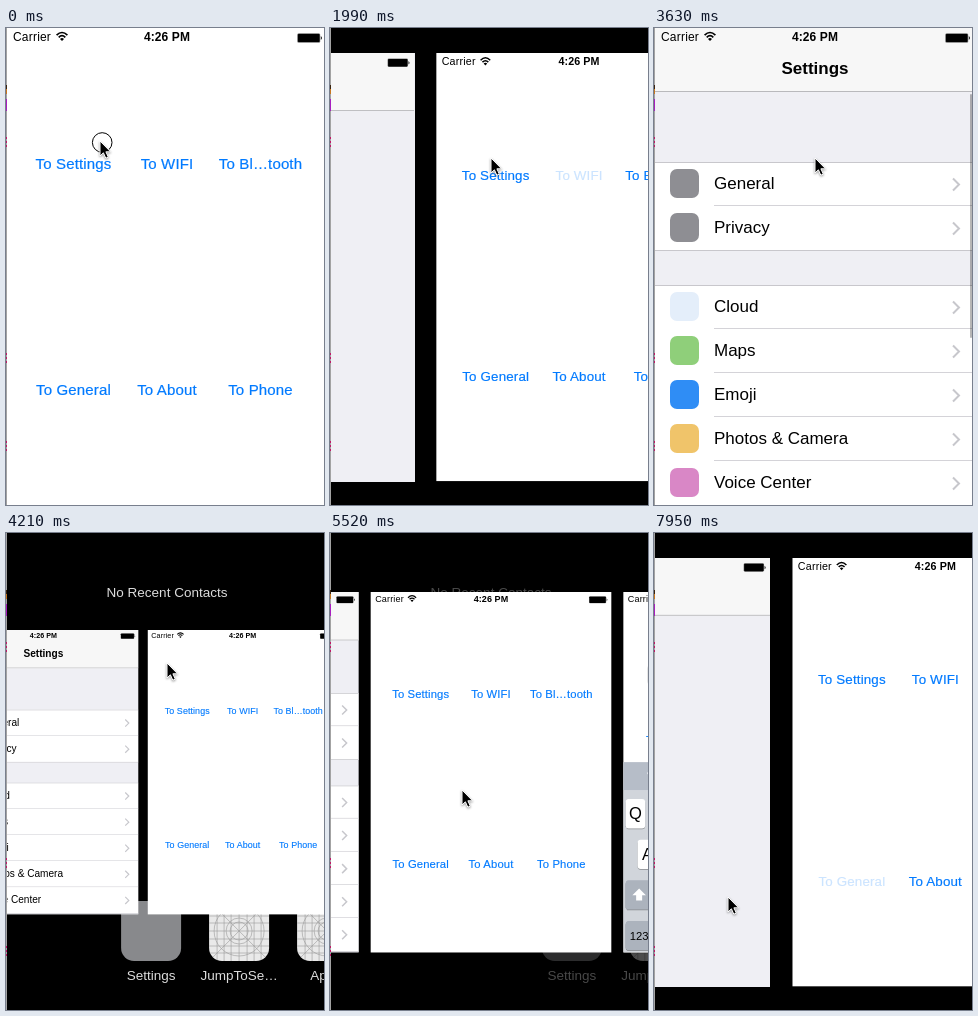
An HTML page for the animation above (8 s loop, 318x477 px).

```html
<!DOCTYPE html>
<html lang="en">
<head>
<meta charset="utf-8">
<title>App switching</title>
<style>
html, body { margin: 0; width: 100%; height: 100%; overflow: hidden; background: #000; }
#stage { position: relative; width: 318px; height: 477px; overflow: hidden; background: #000;
  font-family: "Liberation Sans", Arial, sans-serif; }
#stage * { position: absolute; box-sizing: border-box; white-space: nowrap; }
#stage svg { overflow: visible; }
.mid { transform: translate(-50%, -50%); line-height: 20px; }
.left { transform: translateY(-50%); line-height: 20px; }
.anim, .step { animation: 8s linear infinite; }
.step { animation-timing-function: step-end; }

/* Cards */
#deck { left: 1px; top: -1px; width: 320px; height: 480px; animation-name: slide, zoom; }
.card { width: 320px; height: 480px; background: #fff; overflow: hidden; }
#settings { background: #efeff4; left: -344.7px; animation-name: pitch; }
#other { left: 336px; }
@keyframes slide {
  0%, 22.7% { translate: 0; animation-timing-function: ease-in-out; }
  28.95%, 40% { translate: 344.7px; }
  40.001%, 50.69% { translate: 336px; animation-timing-function: cubic-bezier(.25, 1, .5, 1); }
  57%, 96.8% { translate: 0; animation-timing-function: ease-in; }
  100% { translate: 171px; }
}
@keyframes zoom {
  0%, 21.4% { scale: 1; animation-timing-function: ease-in-out; }
  24.2%, 26.25% { scale: .892; animation-timing-function: ease-in-out; }
  29.25%, 50.69% { scale: 1; animation-timing-function: cubic-bezier(.25, 1, .5, 1); }
  57%, 67% { scale: .475; animation-timing-function: ease-in-out; }
  70.9%, 95.6% { scale: 1; animation-timing-function: ease-in-out; }
  98%, 100% { scale: .893; }
}
@keyframes pitch { 0%, 90% { left: -344.7px; } 40% { left: -336px; } 100% { left: -344.7px; } }

/* Status bar */
.carrier { left: 6px; top: 10px; font-size: 12px; letter-spacing: .2px; }
.clock { left: 160px; top: 10px; font-size: 12px; font-weight: bold; letter-spacing: .1px; }

/* Home */
.link { font-size: 15px; letter-spacing: .15px; color: #007aff; -webkit-text-stroke: .2px; }
.wifi-link { animation-name: press-wifi; }
.general-link { animation-name: press-general; }
@keyframes press-wifi { 0% { color: #007aff; } 19.75% { color: #cce4ff; } 40%, 100% { color: #007aff; } }
@keyframes press-general { 0% { color: #007aff; } 95.6%, 100% { color: #cce4ff; } }

/* Settings */
.nav { width: 320px; height: 65px; background: #f7f7f7; border-bottom: 1px solid #b9b9bc; }
#list { width: 320px; height: 480px; animation-name: load; }
@keyframes load { 0%, 90%, 100% { visibility: hidden; } 30.4% { visibility: visible; } }
.title { left: 160px; top: 42px; font-size: 17px; font-weight: bold; }
.group { width: 320px; background: #fff; border: solid #c8c7cc; border-width: 1px 0; }
.row { left: 0; width: 320px; height: 44px; font-size: 17px; }
.row .rule { left: 59px; right: 0; bottom: 0; height: 1px; background: #d4d3d8; }
.row .swatch { left: 15px; top: 7px; width: 29px; height: 29px; border-radius: 7px; }
.row .left { left: 59px; top: 22px; }
#scrollbar { left: 314.5px; top: 67px; width: 2.5px; height: 244px; border-radius: 2px;
  z-index: 1; animation-name: flash; }
@keyframes flash {
  0%, 32.2%, 46.9%, 100% { background-color: rgba(0, 0, 0, 0); }
  35%, 44.9% { background-color: rgba(0, 0, 0, .38); }
}

/* Keyboard app */
.field { left: 32px; top: 97px; width: 256px; height: 28px; border: 1px solid #d0d0d0; border-radius: 5px; }
.keyboard { top: 227px; width: 320px; height: 253px; background: #d1d5db; }
.hints { width: 320px; height: 37px; background: #b6bdc8; color: #e9ecf0; font-size: 15px; }
.key { height: 39px; border-radius: 4px; background: #fff; box-shadow: 0 1px #898c90;
  font-size: 22px; line-height: 39px; text-align: center; }
.key.dark { background: #acb3bd; font-size: 15px; }

/* Switcher */
#switcher { width: 318px; height: 477px; color: #dcdcdc; font-size: 13.5px; animation-name: reveal; }
#icons { animation-name: icons; }
.icon { width: 60px; height: 60px; top: 368px; border-radius: 13px; overflow: hidden; background: #e9e9e9; }
@keyframes reveal { 0%, 50.69% { opacity: 0; } 52.3%, 67% { opacity: 1; } 70%, 100% { opacity: 0; } }
@keyframes icons {
  0%, 50.69% { translate: 320px; animation-timing-function: cubic-bezier(.25, 1, .5, 1); }
  57%, 67% { translate: 0; animation-timing-function: ease-in-out; }
  70.9%, 100% { translate: 320px; }
}

/* Left screen edge */
#edge { width: 1px; height: 477px; background: #a3a3a3; }
#edge i { width: 1px; }

/* Pointer */
#pointer { animation-name: point; }
#ring { animation-name: click; }
@keyframes point {
  0%, .6% { translate: 94px 113px; animation-timing-function: ease-in-out; }
  7.25%, 10.6% { translate: 221px 132px; animation-timing-function: ease-in-out; }
  16.1%, 61.2% { translate: 161px 130px; animation-timing-function: ease-in-out; }
  63%, 71.5% { translate: 132px 257px; animation-timing-function: ease-in-out; }
  76.25%, 76.8% { translate: 222px 184px; animation-timing-function: ease-out; }
  80%, 84.7% { translate: 251px 135px; }
  85.25% { translate: 246px 146px; animation-timing-function: cubic-bezier(.3, .3, .4, 1); }
  93.8% { translate: 74px 371px; }
  95%, 100% { translate: 74px 364px; }
}
@keyframes click {
  0%, 19.75%, 66.75%, 95.6% { visibility: visible; }
  .62%, 21.4%, 67.4%, 96.4%, 100% { visibility: hidden; }
}
</style>
</head>
<body>
<div id="stage">
  <div id="switcher" class="anim">
    <div class="mid" style="left:161px;top:60px">No Recent Contacts</div>
    <div id="icons" class="anim"></div>
  </div>
  <div id="deck" class="anim">
    <div id="settings" class="card step">
      <div class="nav"></div>
      <div id="list" class="step">
        <div class="title mid">Settings</div>
        <div id="scrollbar" class="anim"></div>
      </div>
    </div>
    <div id="home" class="card"></div>
    <div id="other" class="card">
      <div class="field"></div>
      <div class="link left" style="left:30px;top:197.5px">Test</div>
      <div class="keyboard"><div class="hints"><div class="left" style="left:31px;top:18px">“I”</div></div></div>
    </div>
  </div>
  <div id="edge"></div>
  <svg id="pointer" class="anim" width="12" height="20">
    <circle id="ring" class="step" cx="2.2" cy="1.5" r="9.8" fill="none" stroke="#000"/>
    <path d="M0 0V15L3.4 11.8L5.8 17.2L8.3 16.1L5.9 10.8H10.6Z" stroke="#fff"
      style="filter:drop-shadow(0 1px 1px rgba(0,0,0,.4))"/>
  </svg>
</div>
<script>
const el = id => document.getElementById(id);
const add = (parent, html) => parent.insertAdjacentHTML('beforeend', html);

const statusBar = `
  <div class="carrier left">Carrier</div>
  <svg style="left:49px;top:4px" width="12" height="10" fill="none" stroke="#000" stroke-width="1.7">
    <path d="M.6 4.2Q6 -1.2 11.4 4.2M2.7 6.3Q6 3 9.3 6.3"/>
    <path d="M6 10L4 7.9Q6 6.3 8 7.9Z" fill="#000" stroke="none"/>
  </svg>
  <div class="clock mid">4:26 PM</div>
  <svg style="left:289.5px;top:5.5px" width="26" height="10">
    <rect x=".3" y=".3" width="22.9" height="9.4" rx="1.5" fill="#777"/>
    <rect x=".9" y=".9" width="21.7" height="8.2" rx=".8"/>
    <path d="M23.8 3Q26 5 23.8 7Z"/>
  </svg>`;
document.querySelectorAll('.card').forEach(card => add(card, statusBar));

const link = (text, x, y, cls = '') =>
  add(el('home'), `<div class="link mid step ${cls}" style="left:${x}px;top:${y}px">${text}</div>`);
link('To Settings', 66.5, 137);
link('To WIFI', 160, 137, 'wifi-link');
link('To Bl…tooth', 253.5, 137);
link('To General', 66.5, 363, 'general-link');
link('To About', 160, 363);
link('To Phone', 253.5, 363);

const group = (top, rows) => add(el('list'),
  `<div class="group" style="top:${top}px;height:${rows.length * 44 + 1}px">` +
  rows.map(([text, color], i) => `
    <div class="row" style="top:${i * 44 - 1}px">
      <div class="swatch" style="background:${color}"></div>
      <div class="left">${text}</div>
      ${i < rows.length - 1 ? '<div class="rule"></div>' : ''}
      <svg style="left:297px;top:16px" width="8" height="13">
        <path d="M1 .5L7 6.5L1 12.5" fill="none" stroke="#c7c7cc" stroke-width="2"/>
      </svg>
    </div>`).join('') + '</div>');
group(135, [['General', '#8e8e93'], ['Privacy', '#8e8e93']]);
group(258, [['Cloud', '#e4eefa'], ['Maps', '#8fcf7a'], ['Emoji', '#2f8df5'],
  ['Photos &amp; Camera', '#f0c46a'], ['Voice Center', '#d987c6']]);

const keyboard = document.querySelector('.keyboard');
const key = (text, x, y, w = 26, cls = '') =>
  add(keyboard, `<div class="key ${cls}" style="left:${x}px;top:${y}px;width:${w}px">${text}</div>`);
[['QWERTYUIOP', 3], ['ASDFGHJKL', 19], ['ZXCVBNM', 51]].forEach(([letters, x], row) =>
  [...letters].forEach((c, i) => key(c, x + i * 32, 49 + row * 54)));
const arrow = `<svg style="left:9px;top:11px" width="18" height="17">
  <path d="M9 0L18 9H13V16H5V9H0Z" fill="#fff"/></svg>`;
key(arrow, 3, 157, 36, 'dark');
key('', 281, 157, 36, 'dark');
key('123', 3, 211, 36, 'dark');
key('', 45, 211, 34, 'dark');
key('<span style="position:static;font-size:15px">space</span>', 85, 211, 148);
key('return', 239, 211, 78, 'dark');

const grid = `<svg width="60" height="60" fill="none" stroke="#999" stroke-width=".6">
  <path d="M0 0L60 60M60 0L0 60"/>
  ${[8, 15, 22, 30, 38, 45, 52].map(p => `<path d="M${p} 0V60M0 ${p}H60"/>`).join('')}
  ${[9, 13, 25].map(r => `<circle cx="30" cy="30" r="${r}"/>`).join('')}
</svg>`;
[['Settings', ''], ['JumpToSe…', grid], ['Apply', grid]].forEach(([name, art], i) => {
  const x = 73 + i * 88;
  add(el('icons'), `
    <div class="icon" style="left:${x - 30}px;${art ? '' : 'background:#88898c'}">${art}</div>
    <div class="mid" style="left:${x}px;top:443px">${name}</div>`);
});

const speck = (y, h, color) => add(el('edge'), `<i style="top:${y}px;height:${h}px;background:${color}"></i>`);
speck(57, 4, '#3a2410');
speck(61, 5, '#c87820');
speck(71, 12, '#a81fc0');
[109, 325, 413].forEach(y => [0, 4, 8].forEach(d => speck(y + d, 2, '#c01868')));
</script>
</body>
</html>
```
